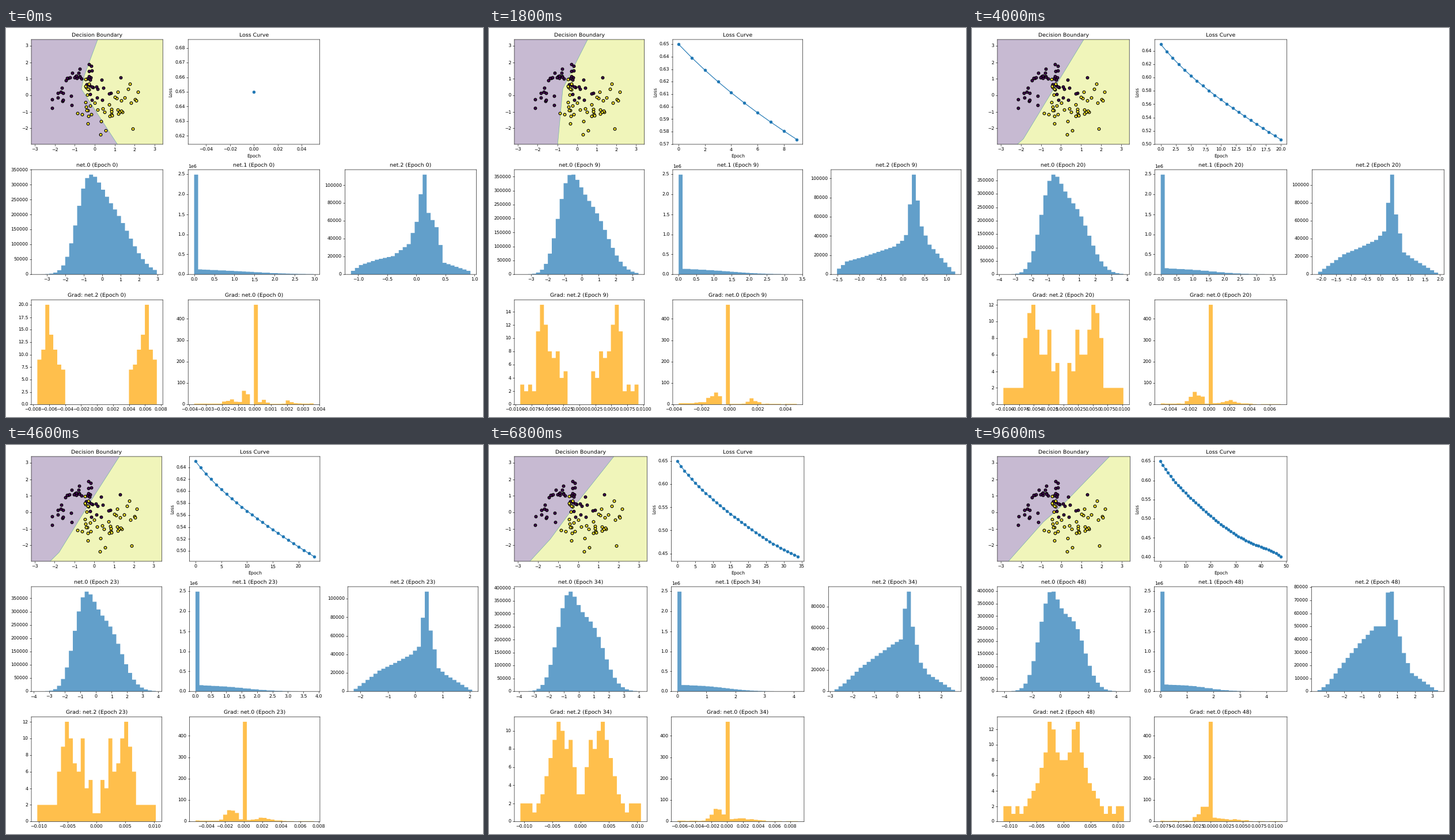
Recreate the animation shown at these times as a matplotlib script. Size 828 px wide and 676 px high, loop 9.8 s.

```python
import numpy as np
import matplotlib.pyplot as plt
from matplotlib.animation import FuncAnimation

W, H, DPI = 828, 676, 56.33
EPOCHS, BINS = 49, 30
XLIM, YLIM = (-3.18, 3.42), (-2.97, 3.38)

# Soft text and edges, as if scaled down from a larger figure
plt.rcParams.update({"text.hinting": "none", "path.snap": False})

# Data clusters: centre x, y, spread x, y, number of points
CLUSTERS_A = [(-1.65, 0, .3, .4, 12), (-.95, 1.2, .2, .2, 13),
              (-.25, 1.0, .12, .42, 12), (.45, .45, .35, .5, 11)]
CLUSTERS_B = [(-.45, .3, .15, .5, 8), (-.35, -1.2, .3, .45, 13),
              (.85, -.95, .4, .4, 15), (1.5, -.25, .4, .6, 11)]

# Key states of the training; all rows below belong to these epochs
KEYS = [0, 9, 20, 48]

# Decision boundary from top to bottom
BOUNDARY = np.array([
    [(.15, 3.38), (-.52, 1.19), (-.67, .38), (1.14, -2.97)],
    [(.54, 3.38), (-.72, .4), (-.8, -.6), (-.98, -2.97)],
    [(1.14, 3.38), (-.28, .55), (-1.88, -2.65), (-2.18, -2.97)],
    [(2.4, 3.38), (.03, .4), (-.9, -.6), (-2.63, -2.97)]])

HIDDEN_RANGE = np.array([(-3.53, 2.97), (-3.62, 3.35),
                         (-3.74, 3.76), (-4.05, 4.55)])
OUT_RANGE = np.array([(-1.125, .93), (-1.51, 1.2),
                      (-2.1, 1.94), (-3.5, 3.32)])

# Output histogram, thousands at a few bins
OUT_BINS = [0, 2, 6, 10, 14, 16, 17, 18, 19, 21, 23, 29]
OUT = np.array([[4, 10.5, 16.5, 20.5, 34, 59, 90, 112, 69, 53, 13, 4],
                [6, 13.5, 18, 23.5, 29, 35, 41, 73, 104, 50, 31, 3],
                [3, 9.5, 22.5, 30, 38.5, 48, 80, 111.5, 67, 24.5, 18, 2],
                [1, 5.5, 22, 37, 50, 50, 76, 76.7, 55, 29.5, 14, 1]])

# Gradient distributions as eight equal shares, in thousandths
GRAD = np.array([[3.99, 4.74, 5.26, 5.65, 5.98, 6.23, 6.48, 6.93, 7.48],
                 [1.85, 3.2, 3.94, 4.82, 5.38, 5.81, 6.2, 6.71, 9.23],
                 [.68, 2.2, 2.88, 4.07, 4.84, 5.33, 5.92, 6.78, 10.17],
                 [0, .99, 1.71, 2.28, 2.85, 3.56, 4.63, 6.3, 11.12]])
BELOW = -np.array([[3.71, 1.98, 1.54, 1.26, .74, .65, .56, .42, .28],
                   [3.64, 2.35, 1.67, 1.42, 1.2, 1.04, .92, .77, .55],
                   [4.82, 2.24, 1.87, 1.61, 1.43, 1.25, 1, .73, .42],
                   [7.73, 2.62, 1.96, 1.51, 1.27, 1.02, .78, .53, .28]])
ABOVE = np.array([[.21, .51, .61, .82, 1.91, 2.07, 2.27, 2.81, 3.64],
                  [.01, 1.17, 1.43, 1.56, 1.68, 1.9, 2.2, 3.36, 4.79],
                  [.33, 1.12, 1.62, 1.92, 2.16, 2.46, 3.01, 4.1, 7.07],
                  [.34, .78, 1.3, 1.93, 2.6, 3.63, 4.38, 5.93, 10.9]])

# Hidden histogram as two bumps: height, middle bin, left and right width
BUMPS_START = np.array([(234, 11.9, 2.7, 3.1), (210, 18, 4.8, 4.8)])
BUMPS_END = np.array([(328, 10.9, 2.7, 2.25), (270, 16.5, 3.2, 3.2)])
CLIPPED = 2.49e6

LOSS = np.polyval(np.polyfit([0, 5, 9, 20, 34, 48],
                             [.65, .603, .5737, .507, .4435, .4013], 5),
                  np.arange(EPOCHS))


def tween(epoch, rows):
    i = min(np.searchsorted(KEYS, epoch, "right") - 1, len(KEYS) - 2)
    f = (epoch - KEYS[i]) / (KEYS[i + 1] - KEYS[i])
    return rows[i] * (1 - f) + rows[i + 1] * f


def bump(x, height, mid, left, right):
    width = np.where(x < mid, left, right)
    return height * np.exp(-((x - mid) / width) ** 2 / 2)


def sample(shares, n):
    """Sorted values that follow a distribution given by equal shares."""
    return np.interp(np.linspace(0, 1, n),
                     np.linspace(0, 1, len(shares)), shares) / 1000


def hidden(epoch):
    p = (epoch / (EPOCHS - 1)) ** .6
    bumps = BUMPS_START * (1 - p) + BUMPS_END * p
    counts = sum(bump(np.arange(BINS), *b) for b in bumps)
    counts *= (334 + 64 * p) * 1000 / counts.max()
    return counts, *tween(epoch, HIDDEN_RANGE)


def activated(epoch):
    """The positive part of the hidden values; the rest piles up at zero."""
    counts, lo, hi = hidden(epoch)
    total = np.concatenate([[0], np.cumsum(counts)])
    counts = np.diff(np.interp(np.linspace(0, hi, BINS + 1),
                               np.linspace(lo, hi, BINS + 1), total))
    counts[0] = CLIPPED
    return counts, 0, hi


def output(epoch):
    counts = np.interp(np.arange(BINS), OUT_BINS, tween(epoch, OUT)) * 1000
    return counts, *tween(epoch, OUT_RANGE)


def output_grad(epoch):
    values = sample(tween(epoch, GRAD), 80)
    top = values[-1]
    half = np.histogram(values, BINS // 2, (0, top))[0]
    return np.concatenate([half[::-1], half]), -top, top


def hidden_grad(epoch):
    values = np.concatenate([sample(tween(epoch, BELOW), 220), np.zeros(465),
                             sample(tween(epoch, ABOVE), 110)])
    lo, hi = values[0], values[-1]
    return np.histogram(values, BINS, (lo, hi))[0], lo, hi


# The tiny surplus keeps rounding from losing a pixel
fig = plt.figure(figsize=((W + 1e-6) / DPI, (H + 1e-6) / DPI), dpi=DPI)
fig.subplots_adjust(.053, .033, .985, .97, .19, .25)
viridis = plt.get_cmap("viridis")
rng = np.random.default_rng(4)

field = fig.add_subplot(3, 3, 1)
field.set_title("Decision Boundary")
left = field.fill([0, 1, 1], [0, 0, 1], color=viridis(.071), alpha=.3, lw=0)[0]
right = field.fill([0, 1, 1], [0, 0, 1], color=viridis(.929), alpha=.3, lw=0)[0]
border, = field.plot([], [], color=viridis(.5), alpha=.6, lw=.8, zorder=1)
for clusters, shade in ((CLUSTERS_A, 0.), (CLUSTERS_B, 1.)):
    for cx, cy, sx, sy, n in clusters:
        field.scatter(rng.normal(cx, sx, n), rng.normal(cy, sy, n),
                      color=viridis(shade), edgecolors="k", linewidths=1.5)
field.set(xlim=XLIM, ylim=YLIM)

curve = fig.add_subplot(3, 3, 2)
curve.set(title="Loss Curve", xlabel="Epoch", ylabel="Loss")
loss_line, = curve.plot([0], LOSS[:1], "o-")

PANELS = [("net.0", "C0", hidden), ("net.1", "C0", activated),
          ("net.2", "C0", output), ("Grad: net.2", "orange", output_grad),
          ("Grad: net.0", "orange", hidden_grad)]
panels = []
for slot, (name, color, histogram) in enumerate(PANELS, 4):
    ax = fig.add_subplot(3, 3, slot)
    bars = ax.stairs(np.ones(BINS), np.linspace(0, 1, BINS + 1), fill=True,
                     facecolor=color, alpha=.7)
    panels.append((ax, name, bars, histogram))


def update(epoch):
    edge = tween(epoch, BOUNDARY)
    for area, x in ((left, XLIM[0]), (right, XLIM[1])):
        area.set_xy([(x, YLIM[1]), *edge, (x, YLIM[0])])
    border.set_data(*edge.T)

    loss_line.set_data(np.arange(epoch + 1), LOSS[:epoch + 1])
    curve.relim()
    curve.autoscale_view()

    for ax, name, bars, histogram in panels:
        counts, lo, hi = histogram(epoch)
        bars.set_data(counts, np.linspace(lo, hi, BINS + 1))
        margin = .05 * (hi - lo)
        ax.set_xlim(lo - margin, hi + margin)
        ax.set_ylim(0, 1.05 * counts.max())
        ax.set_title(f"{name} (Epoch {epoch})")
    fig.tight_layout()


anim = FuncAnimation(fig, update, frames=EPOCHS, interval=200, repeat=True,
                     repeat_delay=0, blit=False)
plt.show()
```
